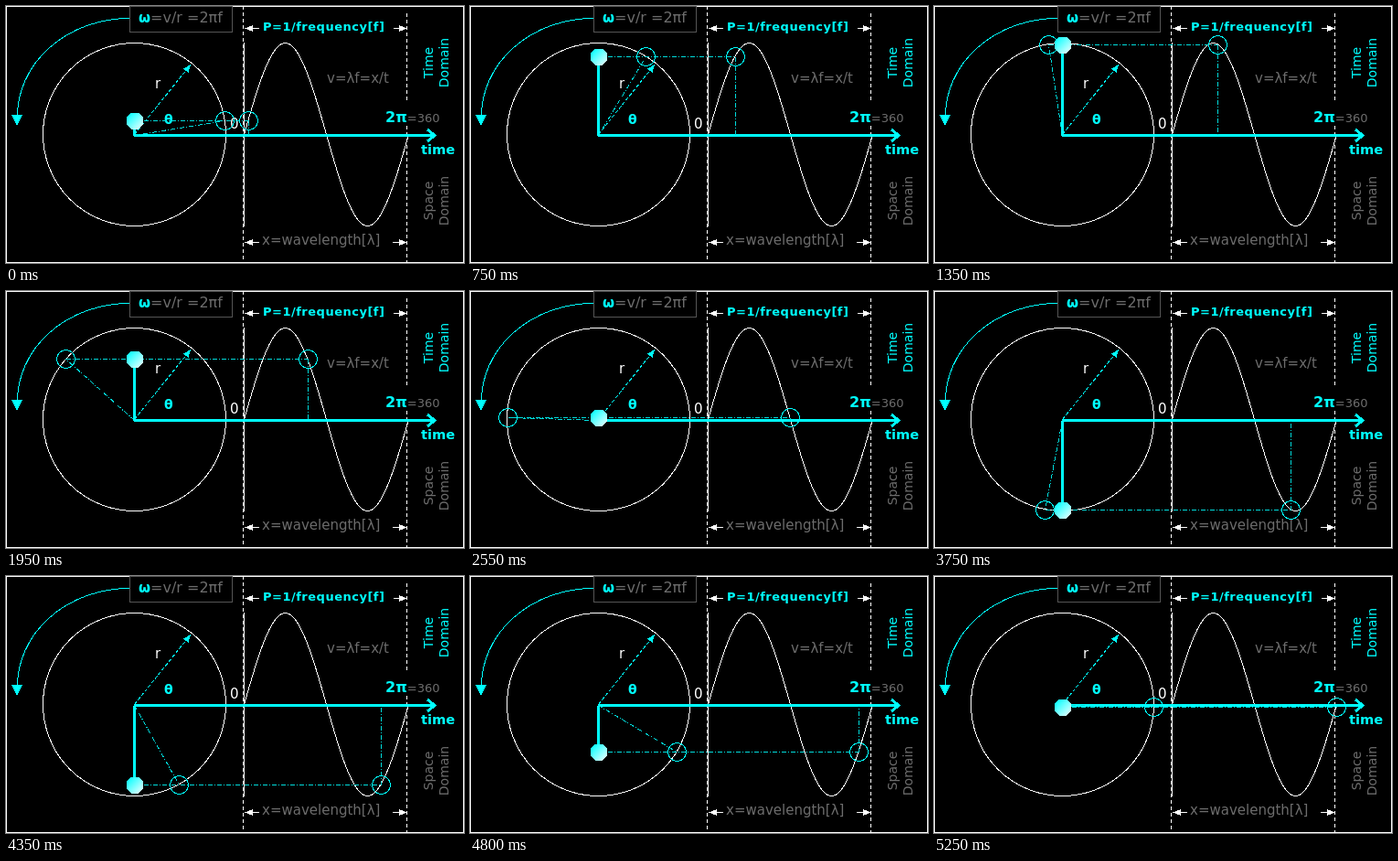
An HTML page that plays this animation: 501x281 px, repeating every 5.4 s.

```html
<!DOCTYPE html>
<html lang="en">
<head>
<meta charset="utf-8">
<title>Sine wave and rotating radius</title>
<style>
html, body { margin: 0; width: 100%; height: 100%; overflow: hidden; background: #000; }
svg { display: block; width: 100%; height: 100%; shape-rendering: crispEdges; }
text { font: 15px "DejaVu Sans", Verdana, sans-serif; fill: #6c6c6c; }
.bold { font-weight: bold; }
.cyan { fill: #0ff; }
.white { fill: #fff; }
.side text { font-size: 14px; text-anchor: middle; }
.line { fill: none; stroke: #fff; }
.thin { fill: none; stroke: #0dd; stroke-dasharray: 5 2 1 2; }
.thick { fill: none; stroke: #0ff; stroke-width: 3; }
.ring { fill: none; stroke: #0ff; }
</style>
</head>
<body>
<svg viewBox="0 0 501 281">
  <defs>
    <linearGradient id="shine" x1="0" y1="0" x2="1" y2="1">
      <stop offset=".15" stop-color="#1ff"/>
      <stop offset="1" stop-color="#f0ffff"/>
    </linearGradient>
    <marker id="tip" viewBox="0 0 9 7" markerWidth="9" markerHeight="7" refX="8" refY="3.5"
      orient="auto" markerUnits="userSpaceOnUse">
      <path d="M0 0L9 3.5L0 7Z" fill="#fff"/>
    </marker>
  </defs>
  <rect width="501" height="281"/>
  <rect class="line" x=".5" y=".5" width="500" height="280"/>

  <!-- Fixed diagram -->
  <circle class="line" cx="140.5" cy="140.5" r="100"/>
  <path class="line" d="M260.5 40V241"/>
  <path class="line" stroke-dasharray="4 3" d="M259.5 0V281M438.5 8V106M438.5 131V281"/>
  <path class="line" id="wave"/>
  <g class="line">
    <path marker-end="url(#tip)" d="M277 24.5H262"/>
    <path marker-end="url(#tip)" d="M424 24.5H438"/>
    <path marker-end="url(#tip)" d="M277 258.5H262"/>
    <path marker-end="url(#tip)" d="M423 258.5H438"/>
  </g>
  <path class="ring" d="M135 13.5A122.5 107 0 0 0 12.5 121"/>
  <path class="cyan" d="M6 119H18L12 131Z"/>
  <rect x="135.5" y="0.5" width="112" height="28" stroke="#555"/>

  <text x="145" y="18" style="font-size:16px"><tspan class="bold cyan" style="font-size:15px">ω</tspan>=v/r =2πf</text>
  <text class="bold cyan" x="281" y="27" style="font-size:13px;letter-spacing:.5px">P=1/frequency[f]</text>
  <text x="351" y="84">v=λf=x/t</text>
  <text x="280" y="261">x=wavelength[λ]</text>
  <text x="415" y="127" style="font-size:13px"><tspan class="bold cyan" style="font-size:16px">2π</tspan>=360</text>
  <text class="bold cyan" x="454" y="162" style="font-size:14.6px">time</text>
  <text class="white" x="245" y="134">0</text>
  <text class="white" x="163" y="90">r</text>
  <text class="bold cyan" x="173" y="129" style="font-size:14px">θ</text>
  <g class="side">
    <text class="cyan" transform="translate(467 62) rotate(-90)">Time</text>
    <text class="cyan" transform="translate(484 62) rotate(-90)">Domain</text>
    <text transform="translate(467 213) rotate(-90)">Space</text>
    <text transform="translate(484 213) rotate(-90)">Domain</text>
  </g>

  <path class="ring" stroke-dasharray="4 2" d="M140.5 140.5L198 69"/>
  <path class="cyan" d="M202 64L199.5 73L194 68.5Z"/>
  <path class="thick" d="M140 141.5H468M461 135L469 141.5L461 148"/>

  <!-- Moving parts -->
  <path class="thin" id="level"/>
  <path class="thin" id="radius"/>
  <path class="thin" id="drop"/>
  <path class="thick" id="bar"/>
  <circle class="ring" id="spin" r="10"/>
  <circle class="ring" id="ride" r="10"/>
  <path id="ball" fill="url(#shine)" d="M-4 -9H4L9 -4V4L4 9H-4L-9 4V-4Z"/>
</svg>
<script>
const STEP = 150, STEPS = 36;
const MID = 140.5, AXIS = 141.5, R = 100, LAG = 1.3;
const el = id => document.getElementById(id);
const rad = deg => deg * Math.PI / 180;
const set = (id, attrs) => {
  for (const name in attrs) el(id).setAttribute(name, attrs[name]);
};

let wave = "";
for (let deg = 0; deg <= 360; deg += 4) {
  wave += (deg ? "L" : "M") + (260.5 + deg / 2) + " " + (MID - R * Math.sin(rad(deg))).toFixed(2);
}
set("wave", { d: wave });

function draw(step) {
  const deg = (step + 1) * 10;
  const angle = rad(deg - LAG);
  const x = Math.round(MID + R * Math.cos(angle)) + .5;
  const y = Math.round(MID - R * Math.sin(angle)) + .5;
  const waveX = 260.5 + deg / 2;
  const left = Math.min(x, MID);

  set("level", { d: `M${left} ${y}H${waveX}` });
  set("radius", { d: `M${MID} ${AXIS}L${x} ${y}` });
  set("drop", { d: `M${waveX} ${y}V${AXIS}` });
  set("bar", { d: `M${MID} ${AXIS}V${y}` });
  set("spin", { cx: x, cy: y });
  set("ride", { cx: waveX, cy: y });
  set("ball", { transform: `translate(${MID} ${y})` });
}

const start = performance.now();
function tick() {
  draw(Math.floor((performance.now() - start) / STEP) % STEPS);
  requestAnimationFrame(tick);
}
tick();
</script>
</body>
</html>
```
